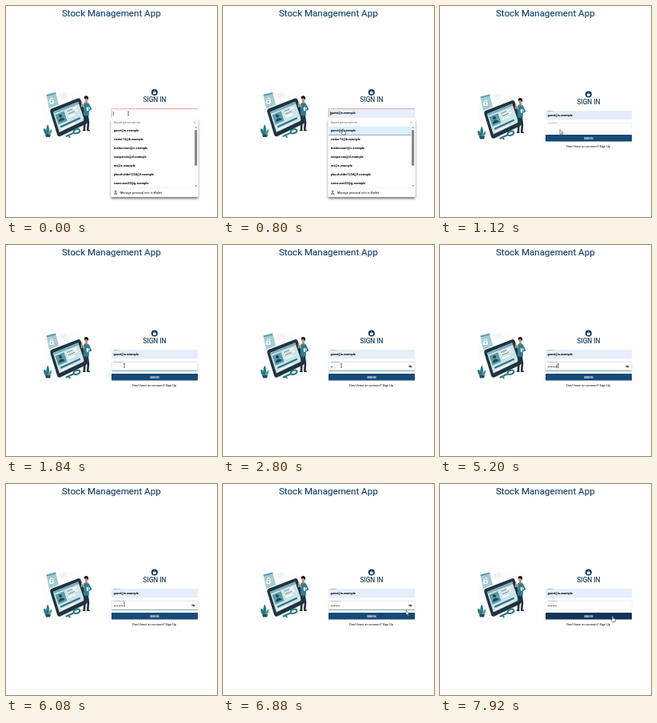
Write an HTML page that moves like this. It is 264x264 px and loops after 8000 ms.

```html
<!DOCTYPE html>
<html lang="en">
<head>
<meta charset="utf-8">
<title>Stock Management App</title>
<style>
html, body { margin: 0; width: 100%; height: 100%; overflow: hidden; background: #fff; }
svg { display: block; width: 100vw; height: 100vh; }
text { font-family: Roboto, Arial, sans-serif; }
.mail { font-size: 3.9px; font-weight: 700; fill: #000; }
.tiny { font-size: 2.5px; fill: #555; }
.mid { text-anchor: middle; }
</style>
</head>
<body>
<svg viewBox="0 0 264 264">
  <defs>
    <filter id="shadow" x="-10%" y="-10%" width="120%" height="125%">
      <feDropShadow dx="0" dy="2" stdDeviation="1.7" flood-color="#000" flood-opacity=".55"/>
    </filter>
  </defs>
  <rect width="264" height="264" fill="#fff"/>
  <text class="mid" x="131.8" y="13.2" font-size="11.6" fill="#123f68" stroke="#123f68" stroke-width=".12">Stock Management App</text>

  <g id="page">
    <g id="art">
      <path d="M47 139Q43 123 56 116Q76 107 94 113Q113 121 108 145Q101 168 73 168Q51 164 47 139Z" fill="#fcfdfd"/>
      <g id="panel">
        <path d="M50.5 113.5L62 110.5L66 126L54 131Z" fill="#a3cbd2"/>
        <path d="M50.5 113.5L62 110.5L62.5 112.5L51 115.6Z" fill="#5f9faa"/>
        <path d="M67 112L75 110L77 116L69 119Z" fill="#eef5f6"/>
        <path d="M55.2 120.5V119Q56.7 116 58.7 118.5V120.5" fill="none" stroke="#fff" stroke-width="1"/>
        <rect x="54.2" y="120.2" width="5.5" height="4.8" rx=".7" fill="#fff"/>
        <circle cx="56.9" cy="122.5" r=".8" fill="#2d7886"/>
      </g>

      <g id="tablet" transform="translate(0 -1)">
        <path d="M55.5 136.5Q54.5 133 57.5 131.8L90 119.2Q92.8 118.5 93.8 121.5L102.5 147Q103 149.5 100.5 151L68 166.6Q65 167.6 64 164.5Z" fill="#20333f"/>
        <path d="M58.8 136L90.3 123.3L98.3 146.6L66.8 161.5Z" fill="#cfe4e9"/>
        <path d="M58.8 136L90.3 123.3L91.2 126L59.6 138.6Z" fill="#79aebb"/>
        <path d="M61.5 139.8L72.5 135.2L76.5 147L65.7 151.8Z" fill="#5b9dab"/>
        <circle cx="68" cy="141" r="2" fill="#1f4552"/>
        <path d="M66 148.7Q66 144.5 69.5 143.8Q73 143.5 73.7 145.7Z" fill="#1f4552"/>
        <g stroke-linecap="round" fill="none">
          <path d="M76 135.5L87.5 130.7M77.2 139L89 134.1M78.5 142.5L86 139.3" stroke="#fff" stroke-width="1.8"/>
          <path d="M76.5 135.3L83 132.6M78 138.7L86 135.4" stroke="#35606e" stroke-width=".8"/>
          <path d="M69 154.5L92 144" stroke="#2b7585" stroke-width="2.2"/>
          <path d="M70 158L86 150.6" stroke="#fff" stroke-width="1.4"/>
        </g>
      </g>

      <g id="person" transform="translate(1 -.5)">
        <g stroke-linecap="round" stroke-linejoin="round" fill="none">
          <path d="M97.8 139L97.5 149L97 157M100.6 139L102 149L101.3 157" stroke="#20333f" stroke-width="2.6"/>
          <path d="M95.6 158.6H98M100.7 158.6H103.2" stroke="#122630" stroke-width="1.6"/>
          <path d="M96.6 126.5L93.4 129L93.8 123.5" stroke="#c88972" stroke-width="1.4"/>
          <path d="M102.5 126.5L105.3 132.3L101 134" stroke="#2c7f8f" stroke-width="1.8"/>
        </g>
        <path d="M96.4 124.6Q99.5 122.8 102.8 125L102.8 140H96Z" fill="#2c7f8f"/>
        <path d="M98.2 121H100.8V124.5Q99.4 126 98.2 124.5Z" fill="#bd7f68"/>
        <ellipse cx="99.3" cy="119.6" rx="1.9" ry="2.6" fill="#cf917a"/>
        <path d="M96.9 119.2Q96 115.5 99.6 115.4Q103 115.6 101.9 120.7L100.8 119.2Q100 118 96.9 119.2Z" fill="#101a20"/>
        <path d="M99.5 130L102.4 129.4V133.8L100 134.5Z" fill="#e8f3f5"/>
      </g>

      <g id="plant">
        <g fill="#2b7585">
          <path d="M52 165Q45.5 161 47.5 155.5Q52 157 52 165Z"/>
          <path d="M52 165Q48.5 156 52.3 150.5Q56 157 52 165Z"/>
          <path d="M52 165Q53 157.5 57.3 156.5Q58 162.5 52 165Z" fill="#4f9aa8"/>
        </g>
        <path d="M49 163H56L55 166.6H50Z" fill="#264d5b"/>
      </g>
      <g id="key" fill="none" stroke="#2b7585" stroke-linecap="round">
        <ellipse cx="88.5" cy="159.3" rx="4" ry="2.4" stroke-width="2" transform="rotate(-18 88.5 159.3)"/>
        <path d="M84.2 161.5L75.5 165.5M78.2 164.5L79.8 166.5" stroke-width="2"/>
      </g>
    </g>

    <circle cx="185.8" cy="110.6" r="4" fill="#0f375c"/>
    <rect x="183.9" y="110" width="3.8" height="2.8" rx=".4" fill="#fff"/>
    <path d="M184.7 110.2V109.4Q185.8 107.5 186.9 109.4V110.2" fill="none" stroke="#fff" stroke-width=".6"/>
    <text class="mid" x="186" y="122.9" font-size="8.3" fill="#0d3048" stroke="#0d3048" stroke-width=".1">SIGN IN</text>

    <rect id="mailBox" x="132" y="131" width="108" height="11.3" rx=".5"/>
    <path id="mailEdge" d="M132.2 142V131.2H240" fill="none" stroke="#d9534c" stroke-width=".5"/>
    <rect x="134" y="130" width="8.6" height="1.5" fill="#fff"/>
    <text id="mailLabel" class="tiny" x="134.7" y="131.9">Email *</text>
    <text id="mailText" class="mail" x="134.5" y="138"></text>

    <rect id="passBox" x="132" y="146.3" width="108" height="11.2" rx=".8" fill="#fff" stroke-width=".3"/>
    <path id="passEdge" d="M132.3 157.4H239.7" stroke="#3f7078" stroke-width=".6"/>
    <rect x="134" y="145.4" width="12" height="1.7" fill="#fff"/>
    <text id="passLabel" class="tiny" x="134.7" y="147.3">Password *</text>
    <g id="dots" fill="#111"></g>
    <g id="eye" fill="none" stroke="#333" stroke-width=".55">
      <path d="M232.2 152Q234.4 149.9 236.6 152Q234.4 154.1 232.2 152Z"/>
      <circle cx="234.4" cy="152" r=".5" fill="#333"/>
      <path d="M232.7 150.3L236.2 153.7"/>
    </g>

    <rect id="button" x="132" y="161" width="108" height="8.6" rx=".5"/>
    <text class="mid" x="185.8" y="166.5" font-size="3.2" font-weight="700" fill="#fff">SIGN IN</text>
    <text class="mid" x="185.6" y="177.2" font-size="3.95" fill="#000">Don't have an account? Sign Up</text>
  </g>

  <g id="menu">
    <rect x="131.5" y="140.8" width="109" height="98.2" rx="1.2" fill="#fff" filter="url(#shadow)"/>
    <text x="134.8" y="147.2" font-size="3.8" fill="#666">Saved personal info</text>
    <path d="M234.7 144.7L236.9 146.9M236.9 144.7L234.7 146.9" stroke="#666" stroke-width=".4"/>
    <g id="hover">
      <rect x="132" y="150.8" width="103.5" height="10.8" fill="#dbeffa"/>
      <path d="M132 161.4H235.5" stroke="#4f7d96" stroke-width=".6"/>
    </g>
    <g id="items"></g>
    <rect x="235.6" y="150" width="4.3" height="77.5" fill="#fafafa"/>
    <rect x="236.1" y="155" width="3" height="45" rx="1.4" fill="#858585"/>
    <path d="M236.6 152.5L237.7 151L238.8 152.5ZM236.6 224.6L237.7 226.1L238.8 224.6Z" fill="#555"/>
    <path d="M132 227.7H240" stroke="#e6e6e6" stroke-width=".4"/>
    <g fill="none" stroke="#222" stroke-width=".6">
      <circle cx="137.2" cy="232" r="1"/>
      <path d="M135.2 235.2Q137.2 232.2 139.2 235.2Z"/>
    </g>
    <text x="143" y="234.7" font-size="3.8" fill="#000">Manage personal info in Wallet</text>
  </g>

  <path id="caret" d="M0 -2.6V2.6" stroke="#111" stroke-width=".6"/>
  <g id="mouse">
    <path id="beam" d="M-.8 -2.4H.8M0 -2.4V2.4M-.8 2.4H.8" fill="none" stroke="#111" stroke-width=".6"/>
    <path id="arrow" d="M0 -2V4L1.4 2.8L2.4 5L3.4 4.5L2.4 2.4H4.2Z" fill="#fff" stroke="#111" stroke-width=".5"/>
    <path id="hand" d="M-.7 -2.5Q0 -3.3 .7 -2.5V.1L3.2 .8Q3.8 1.1 3.6 2L3 4.6H-.4L-2.3 1.7Q-2.2 .7 -.7 1.8Z" fill="#fff" stroke="#111" stroke-width=".5"/>
  </g>
</svg>
<script>
const LOOP = 8000, STEP = 80;
const PICK = 1040, FOCUS = 1600, TYPE = 2240, TYPE_GAP = 320, BLUR = 7440;
const mails = [
  "guest@a.example", "visitor12@b.example", "trialaccount@c.example", "newperson@d.example",
  "me@e.example", "placeholder1234@f.example", "someuser20@g.example"
];
// time, x, y
const path = [
  [0, 153, 134.5], [240, 153, 134.5], [720, 150, 156.5], [1120, 150, 156.5], [1520, 148, 150.7],
  [6240, 148, 150.7], [6880, 229, 160], [7120, 229, 160], [7440, 216, 168], [LOOP, 216, 168]
];
const svgNS = "http://www.w3.org/2000/svg";
const $ = id => document.getElementById(id);

function set(el, attrs) {
  for (const key in attrs) el.setAttribute(key, attrs[key]);
}
function add(parent, tag, attrs) {
  const el = document.createElementNS(svgNS, tag);
  set(el, attrs);
  return parent.appendChild(el);
}
const show = (id, on) => { $(id).style.display = on ? "" : "none"; };

mails.forEach((mail, i) => {
  add($("items"), "text", { class: "mail", x: 134.8, y: 157.4 + i * 11 }).textContent = mail;
});
const dots = Array.from({ length: 8 }, (_, i) =>
  add($("dots"), "circle", { cx: 135.3 + i * 1.45, cy: 152.6, r: 0.5 }));

function mouseAt(t) {
  const i = path.findIndex(p => p[0] > t);
  const [t0, x0, y0] = path[i - 1], [t1, x1, y1] = path[i];
  const u = (t - t0) / (t1 - t0), k = u * u * (3 - 2 * u);
  return [x0 + (x1 - x0) * k, y0 + (y1 - y0) * k];
}

function draw(t) {
  const open = t < PICK;
  const [x, y] = mouseAt(t);
  const hovering = open && y > 150;
  const filled = hovering || !open;
  const focused = t >= FOCUS && t < BLUR;
  const typed = Math.max(0, Math.min(dots.length, Math.floor((t - TYPE) / TYPE_GAP) + 1));

  set($("page"), { transform: `translate(0 ${open ? -2.6 : 0})` });
  show("menu", open);
  show("hover", hovering);
  show("mailEdge", open);
  set($("mailBox"), { fill: filled ? "#e6eefb" : "#fff" });
  $("mailLabel").style.fill = open ? "#d32f2f" : "#555";
  $("mailText").textContent = filled ? mails[0] : "";

  set($("passBox"), { stroke: focused ? "#8fa9ad" : "#ccc" });
  show("passEdge", focused);
  $("passLabel").style.fill = focused ? "#1b4a78" : "#555";
  dots.forEach((dot, i) => { dot.style.display = i < typed ? "" : "none"; });
  show("eye", typed > 0 && t < BLUR);

  const onButton = t > 7120 && y > 161;
  set($("button"), { fill: onButton ? "#12345a" : "#174a78" });

  const caretX = focused ? 134.5 + typed * 1.45 : 134.5;
  set($("caret"), { transform: `translate(${caretX} ${focused ? 151.8 : 134.6})` });
  show("caret", open || focused && t % 1040 < 520);

  const overField = t < 6240 && (open ? y < 140 : y < 152 && t >= 1360);
  const shape = overField ? "beam" : hovering || onButton ? "hand" : "arrow";
  for (const id of ["beam", "arrow", "hand"]) show(id, id === shape);
  set($("mouse"), { transform: `translate(${x} ${y})` });
}

function tick() {
  const t = performance.now() % LOOP;
  draw(Math.floor(t / STEP) * STEP);
  requestAnimationFrame(tick);
}
tick();
</script>
</body>
</html>
```
